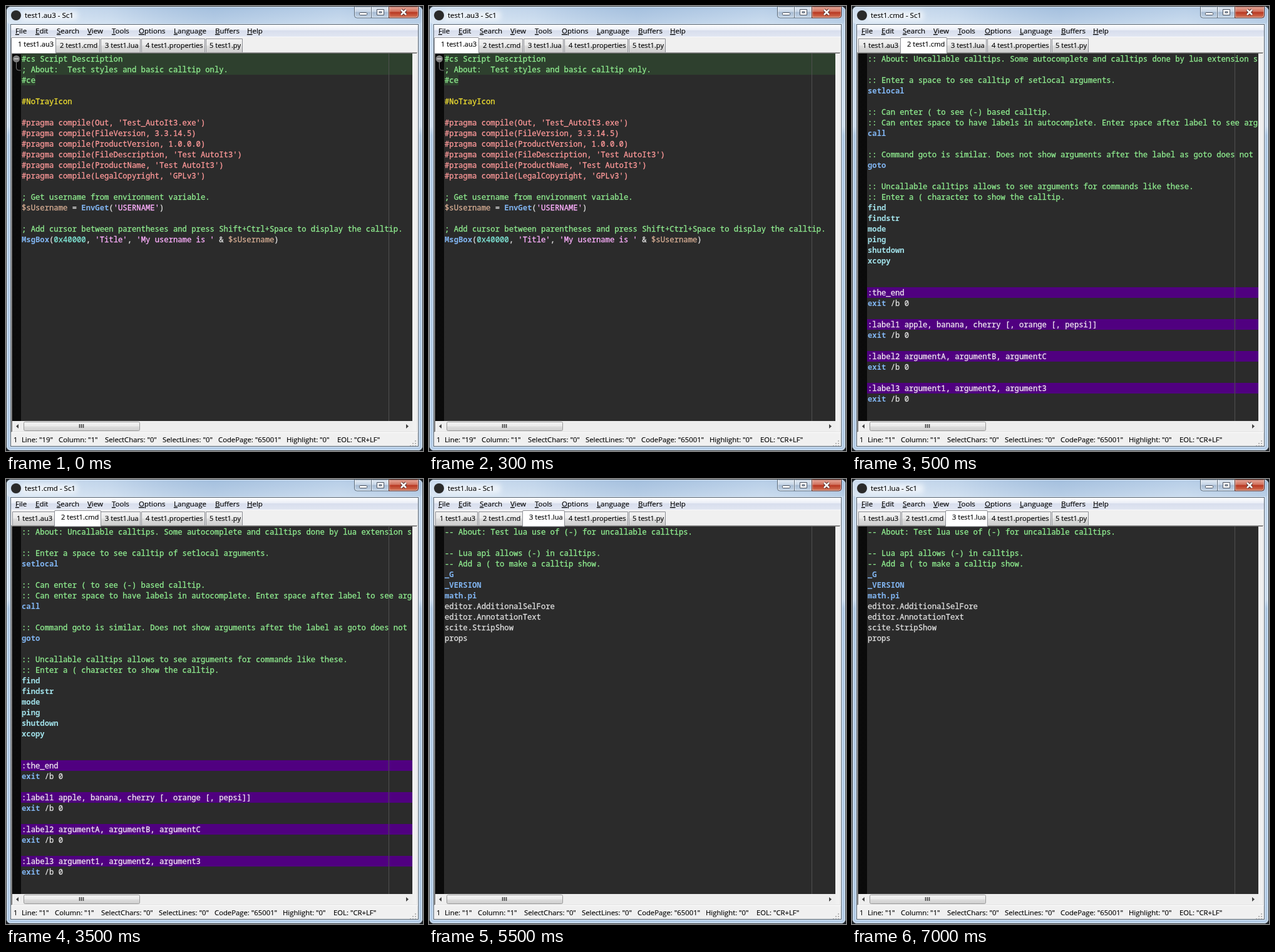
An HTML page that plays this animation: 666 px wide and 712 px high, repeating every 8000 ms.

```html
<!DOCTYPE html>
<html lang="en">
<head>
<meta charset="utf-8">
<title>Editor tabs</title>
<style>
html, body { margin: 0; width: 100%; height: 100%; overflow: hidden; background: #1c2024; }
svg { display: block; }
text { white-space: pre; }
.ui { font-family: "Open Sans", "Noto Sans", sans-serif; font-size: 11.5px; fill: #000; stroke: #000; stroke-width: .15px; }
.tab { font-size: 11.1px; }
.status { font-size: 11.3px; }
.code { font-family: "Noto Sans Mono", "DejaVu Sans Mono", monospace; font-size: 12.22px; color: #e0e0e0; fill: currentColor; stroke: currentColor; stroke-width: .3px; }
.c { color: #90ee90; }
.y { color: #f0e030; }
.p { color: #ff9999; }
.v { color: #d8ae94; }
.s { color: #ffb0ff; }
.n { color: #80e8d8; }
.k { color: #80b4f0; font-weight: bold; stroke: none; }
.x { color: #a0e0e8; font-weight: bold; stroke: none; }
.l { color: #f0e8f0; }
</style>
</head>
<body>
<svg id="stage" width="666" height="712" viewBox="0 0 666 712">
  <defs>
    <linearGradient id="glass" x2="0" y2="1">
      <stop offset="0" stop-color="#a9c4e2"/><stop offset=".04" stop-color="#c3d7ec"/>
      <stop offset=".27" stop-color="#cfdeee"/><stop offset=".29" stop-color="#b0c9e4"/>
      <stop offset="1" stop-color="#b4cce6"/>
    </linearGradient>
    <linearGradient id="shine">
      <stop offset="0" stop-color="#fff" stop-opacity=".4"/><stop offset=".25" stop-color="#fff" stop-opacity=".25"/>
      <stop offset=".5" stop-color="#7f9fc4" stop-opacity=".15"/><stop offset=".8" stop-color="#fff" stop-opacity=".15"/>
      <stop offset="1" stop-color="#8aa8c8" stop-opacity=".15"/>
    </linearGradient>
    <linearGradient id="menu" x2="0" y2="1">
      <stop offset="0" stop-color="#fff"/><stop offset=".45" stop-color="#e9edf6"/>
      <stop offset=".5" stop-color="#d8deed"/><stop offset="1" stop-color="#e1e6f2"/>
    </linearGradient>
    <linearGradient id="tab" x2="0" y2="1">
      <stop offset="0" stop-color="#f2f2f2"/><stop offset=".48" stop-color="#ebebeb"/>
      <stop offset=".52" stop-color="#dddddd"/><stop offset="1" stop-color="#cfcfcf"/>
    </linearGradient>
    <linearGradient id="btn" x2="0" y2="1">
      <stop offset="0" stop-color="#e4ecf5"/><stop offset=".45" stop-color="#c6d5e6"/>
      <stop offset=".5" stop-color="#a6bad1"/><stop offset="1" stop-color="#c3d5e8"/>
    </linearGradient>
    <linearGradient id="close" x2="0" y2="1">
      <stop offset="0" stop-color="#e8aa9c"/><stop offset=".45" stop-color="#d0705c"/>
      <stop offset=".5" stop-color="#b83620"/><stop offset="1" stop-color="#d4785a"/>
    </linearGradient>
    <pattern id="gutter" width="2" height="2" patternUnits="userSpaceOnUse">
      <rect width="2" height="2" fill="#000"/>
      <path d="M0 0h1v1h-1zM1 1h1v1h-1z" fill="#151515"/>
    </pattern>
    <filter id="glow" x="-20%" y="-80%" width="140%" height="260%"><feGaussianBlur stdDeviation="4"/></filter>
    <clipPath id="view"><rect x="10" y="76" width="639" height="588"/></clipPath>
  </defs>

  <rect x=".5" y=".5" width="665" height="711" rx="7" fill="url(#glass)" stroke="#22282e"/>
  <rect x="2" y="2" width="662" height="27" rx="5" fill="url(#shine)"/>
  <rect x="1.5" y="1.5" width="663" height="709" rx="6" fill="none" stroke="#eef5fb" stroke-opacity=".8"/>
  <rect x="24" y="8" width="90" height="15" fill="#fff" opacity=".65" filter="url(#glow)"/>
  <circle cx="16" cy="15" r="8" fill="#2a2a2a"/>

  <g stroke="#586878">
    <path d="M556.5 1v14q0 4 4 4h23v-18z" fill="url(#btn)"/>
    <path d="M583.5 1v18h28v-18z" fill="url(#btn)"/>
    <path d="M611.5 1v18h43q4 0 4-4v-14z" fill="url(#close)" stroke="#5a2820"/>
  </g>
  <path d="M557.5 1v14q0 3 3 3h22v-17M584.5 1v17h26v-17M612.5 1v17h42q3 0 3-3v-14" fill="none" stroke="#fff" stroke-opacity=".5"/>
  <g fill="#fff" stroke="#4a5260">
    <rect x="564.5" y="10.500" width="12" height="4" rx="1"/>
    <path d="M592.500 5.500h11v9h-11zM596 9h4v2h-4z" fill-rule="evenodd"/>
  </g>
  <path d="M631 6l8 8M639 6l-8 8" stroke="#58302c" stroke-width="4.600"/>
  <path d="M631 6l8 8M639 6l-8 8" stroke="#fff" stroke-width="2.600"/>

  <rect x="7.500" y="29.500" width="651" height="675" fill="#f0f0f0" stroke="#53606e"/>
  <rect x="6.500" y="28.500" width="653" height="677" fill="none" stroke="#e2eef9" stroke-opacity=".8"/>
  <rect x="8" y="30" width="650" height="19" fill="url(#menu)"/>
  <path d="M8 49.500h650" stroke="#f8f8fb"/>
  <g id="menuItems" class="ui"></g>

  <path d="M8.500 682V74.500H657" fill="none" stroke="#a0a0a0"/>
  <path d="M9.500 681V75.500H656" fill="none" stroke="#696969"/>
  <path d="M656.500 75V681.500H9" fill="none" stroke="#e3e3e3"/>
  <path d="M657.500 74V682.500H8" fill="none" stroke="#fff"/>
  <rect x="10" y="76" width="639" height="588" fill="#2b2b2b"/>
  <rect x="10" y="76" width="14" height="588" fill="url(#gutter)"/>

  <rect x="10" y="664" width="639" height="17" fill="#eeeeee"/>
  <path d="M20 669v7l-4-3.500zM639 669v7l4-3.500z" fill="#404040"/>
  <rect x="28.500" y="665.500" width="185" height="14" rx="2" fill="url(#tab)" stroke="#979797"/>
  <path d="M117.500 669v6M120.500 669v6M123.500 669v6" stroke="#404040" stroke-width="1.600"/>
  <path d="M654 695v2m0 2v2m0 2v1M650 699v2m0 2v1M646 703v1" stroke="#b4b4b4" stroke-width="2"/>
  <g id="panes"></g>
</svg>
<script>
const LOOP = 8000;
const ADVANCE = 7.333, ROW = 17, TOP = 76, LEFT = 25;

const menu = { File: 15, Edit: 47, Search: 81, View: 130, Tools: 169, Options: 212, Language: 268, Buffers: 334, Help: 385 };

// name, left edge, right edge, label x
const tabs = [
  ["1 test1.au3", 10, 78, 17],
  ["2 test1.cmd", 79, 150, 86],
  ["3 test1.lua", 151, 215, 158],
  ["4 test1.properties", 216, 318, 223],
  ["5 test1.py", 319, 378, 325]
];

// Each line is "style|text" runs split by "~"; a bare run has the default colour.
const au3 = `c|#cs Script Description
c|; About:  Test styles and basic calltip only.
c|#ce

y|#NoTrayIcon

p|#pragma compile(Out, 'Test_AutoIt3.exe')
p|#pragma compile(FileVersion, 3.3.14.5)
p|#pragma compile(ProductVersion, 1.0.0.0)
p|#pragma compile(FileDescription, 'Test AutoIt3')
p|#pragma compile(ProductName, 'Test AutoIt3')
p|#pragma compile(LegalCopyright, 'GPLv3')

c|; Get username from environment variable.
v|$sUsername~ = ~k|EnvGet~(~s|'USERNAME'~)

c|; Add cursor between parentheses and press Shift+Ctrl+Space to display the calltip.
k|MsgBox~(~n|0x40000~, ~s|'Title'~, ~s|'My username is '~ & ~v|$sUsername~)`;

const cmd = `c|:: About: Uncallable calltips. Some autocomplete and calltips done by lua extension s

c|:: Enter a space to see calltip of setlocal arguments.
k|setlocal

c|:: Can enter ( to see (-) based calltip.
c|:: Can enter space to have labels in autocomplete. Enter space after label to see arg
k|call

c|:: Command goto is similar. Does not show arguments after the label as goto does not
k|goto

c|:: Uncallable calltips allows to see arguments for commands like these.
c|:: Enter a ( character to show the calltip.
x|find
x|findstr
x|mode
x|ping
x|shutdown
x|xcopy


l|:the_end
k|exit~ /b 0

l|:label1 apple, banana, cherry [, orange [, pepsi]]
k|exit~ /b 0

l|:label2 argumentA, argumentB, argumentC
k|exit~ /b 0

l|:label3 argument1, argument2, argument3
k|exit~ /b 0`;

const lua = `c|-- About: Test lua use of (-) for uncallable calltips.

c|-- Lua api allows (-) in calltips.
c|-- Add a ( to make a calltip show.
k|_G
k|_VERSION
k|math.pi
editor.AdditionalSelFore
editor.AnnotationText
scite.StripShow
props`;

const esc = s => s.replace(/&/g, "&amp;").replace(/</g, "&lt;");
const label = (x, y, s, cls = "ui") => `<text class="${cls}" x="${x}" y="${y}">${esc(s)}</text>`;
const band = (row, rows, width, fill) =>
  `<rect x="24" y="${TOP + row * ROW}" width="${width}" height="${rows * ROW}" fill="${fill}"/>`;

function codeLine(line, row) {
  let col = 0;
  return line.split("~").map(run => {
    const [, cls = "", str] = run.match(/^(?:([a-z])\|)?(.*)$/);
    const indent = str.length - str.trimStart().length;
    const out = label(LEFT + (col + indent) * ADVANCE, TOP + 13 + row * ROW, str.trim(), "code " + cls);
    col += str.length;
    return out;
  }).join("");
}

function tabStrip(active) {
  const draw = ([name, x0, x1, tx], i) => i === active
    ? `<path d="M${x0 - 1.5} 76V52q0-1.5 1.500-1.500H${x1}q1.500 0 1.500 1.500V76z" fill="#fff" stroke="#8c8e94"/>` +
      label(tx + 2, 65, name, "ui tab")
    : `<path d="M${x0 + .5} 74V52.500H${x1 - .5}V74" fill="url(#tab)" stroke="#8c8e94"/>` +
      label(tx, 67, name, "ui tab");
  const order = tabs.map((t, i) => i).filter(i => i !== active).concat(active);
  return order.map(i => draw(tabs[i], i)).join("");
}

function statusBar(line) {
  const shift = line > 9 ? 6 : 0;
  const fields = [
    [78, 'Column: "1"'], [152, 'SelectChars: "0"'], [244, 'SelectLines: "0"'],
    [333, 'CodePage: "65001"'], [442, 'Highlight: "0"'], [523, 'EOL: "CR+LF"']
  ];
  return label(12, 698, "1", "ui status") + label(25, 698, `Line: "${line}"`, "ui status") +
    fields.map(([x, s]) => label(x + shift, 698, s, "ui status")).join("");
}

function pane({ file, tab, line, code, under = "", over = "" }) {
  return `<g visibility="hidden">${label(30, 19, file + " - Sc1")}${tabStrip(tab)}${statusBar(line)}
    <g clip-path="url(#view)">${under}<path d="M611.500 76V664" stroke="#505050"/>
    ${code.split("\n").map(codeLine).join("")}${over}</g></g>`;
}

const fold = `<path d="M16.500 90v9q0 4 4 4h3" fill="none" stroke="#808080"/>
  <circle cx="16.500" cy="84.500" r="5.500" fill="#808080"/><path d="M13 84.500h7" stroke="#e8e8e8"/>`;
const green = "#2e402e", purple = "#500080";

const scenes = [
  { from: 0, file: "test1.au3", tab: 0, line: 19, code: au3, over: fold,
    under: band(0, 2, 625, green) + band(2, 1, 23, green) },
  { from: 500, file: "test1.cmd", tab: 1, line: 1, code: cmd,
    under: [22, 25, 28, 31].map(r => band(r, 1, 625, purple)).join("") },
  { from: 5500, file: "test1.lua", tab: 2, line: 1, code: lua }
];

const byId = id => document.getElementById(id);
byId("menuItems").innerHTML = Object.entries(menu).map(([s, x]) =>
  `<text x="${x}" y="44"><tspan text-decoration="underline">${s[0]}</tspan>${s.slice(1)}</text>`).join("");
byId("panes").innerHTML = scenes.map(pane).join("");
const panes = [...byId("panes").children];

function render(t) {
  const current = scenes.findLastIndex(s => t >= s.from);
  panes.forEach((p, i) => p.setAttribute("visibility", i === current ? "visible" : "hidden"));
}

const start = performance.now();
function tick() {
  render((performance.now() - start) % LOOP);
  requestAnimationFrame(tick);
}
tick();
</script>
</body>
</html>
```
